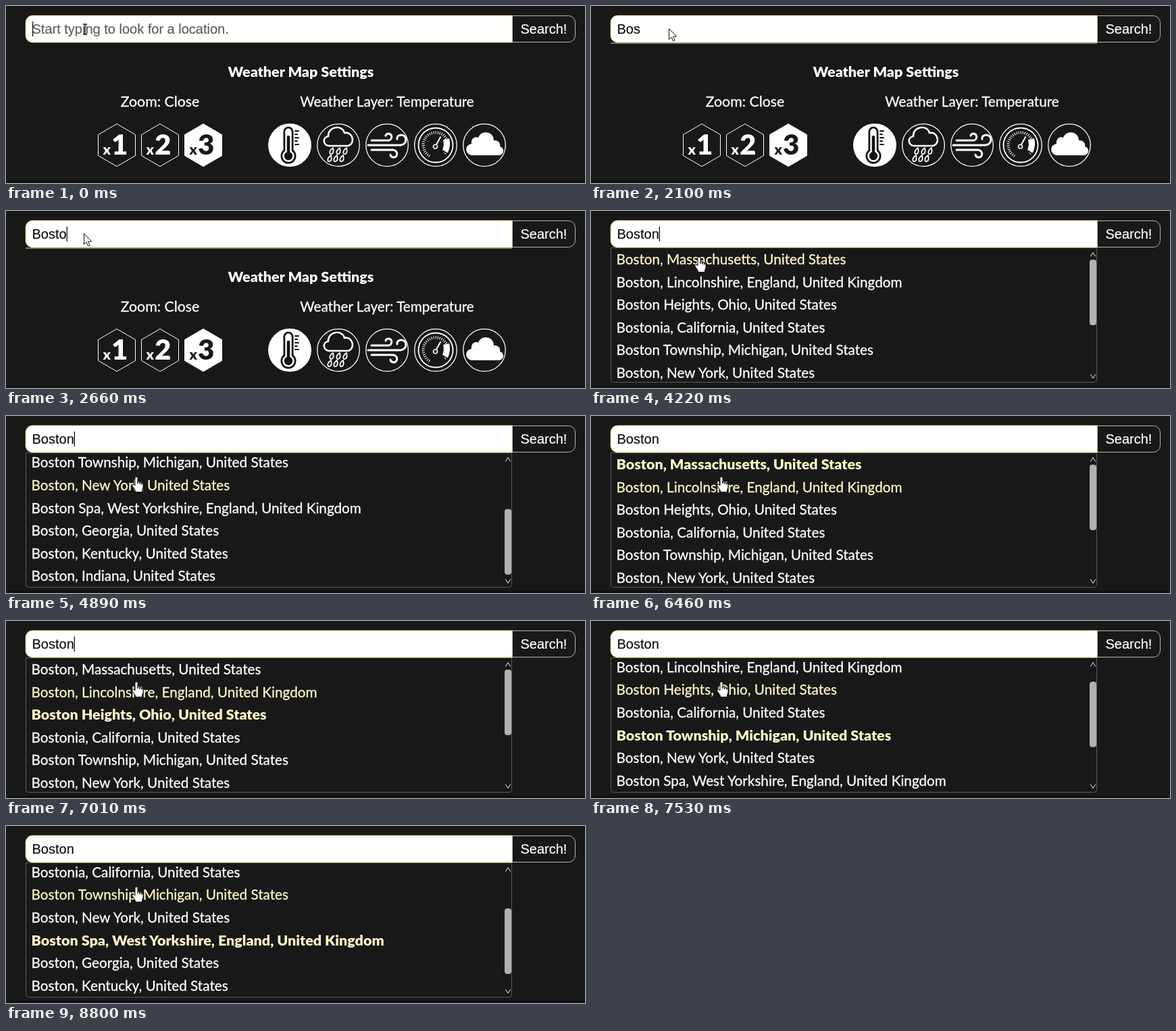
Animation of 857 by 262 pixels, one loop 8.95 s. Source, as an HTML page:

```html
<!DOCTYPE html>
<html lang="en">
<head>
<meta charset="utf-8">
<title>Location search</title>
<style>
  html, body { margin: 0; width: 100%; height: 100%; overflow: hidden; background: #181818; }
  svg { display: block; }
  text {
    font: 20.7px Lato, sans-serif; white-space: pre;
    color: #fff; fill: currentColor; stroke: currentColor; stroke-width: .3px;
  }
  .field { font: 20px "Liberation Sans", Arial, sans-serif; stroke-width: .2px; }
  .heavy, .bold { font-weight: 900; font-size: 21.5px; stroke: none; }
  .line { fill: none; stroke: #fff; stroke-linecap: round; stroke-linejoin: round; }
  .pale { color: #fff8c8; }
</style>
</head>
<body>
<svg width="857" height="262" viewBox="0 0 857 262">
  <rect width="857" height="262" fill="#181818"/>
  <rect y="258" width="857" height="4" fill="#111"/>

  <text class="heavy" x="436.5" y="105" text-anchor="middle">Weather Map Settings</text>
  <text x="228" y="149" text-anchor="middle" style="font-size:21.3px">Zoom: Close</text>
  <text x="564" y="149" text-anchor="middle">Weather Layer: Temperature</text>
  <g id="zooms"></g>
  <g id="rings"></g>

  <!-- thermometer -->
  <g stroke="#111" stroke-linecap="round" fill="none">
    <path d="M418 186V221" stroke-width="15"/>
    <circle cx="418" cy="222" r="11.5" fill="#111" stroke="none"/>
    <path d="M418 186V221" stroke="#fff" stroke-width="9.5"/>
    <circle cx="418" cy="222" r="8.8" fill="#fff" stroke="none"/>
    <path d="M418 194V221" stroke-width="4.5"/>
    <circle cx="418" cy="222" r="6.2" fill="#111" stroke="none"/>
    <path d="M428 185h5M428 190h3M428 195h5M428 200h3M428 205h5" stroke-width="2"/>
  </g>
  <!-- rain -->
  <path class="line" stroke-width="2.6" d="M478 207C469 206 468 194 477 193C476 178 498 175 501 188C513 185 518 204 506 207Z"/>
  <g id="drops" class="line" stroke-width="1.8"></g>
  <!-- wind -->
  <path class="line" stroke-width="3" d="M541 199H566C573 198 572 188 565 189Q562 190 562 192M536 206H584C595 205 594 190 584 191Q578 192 579 197M541 213H573C581 214 580 225 573 224Q569 223 569 220"/>
  <!-- gauge -->
  <g class="line">
    <circle cx="636" cy="206" r="25.5" stroke-width="1.8"/>
    <path d="M627 222A18.5 18.5 0 1 1 649 219" stroke-width="4" stroke-dasharray="1 2" stroke-linecap="butt"/>
    <path d="M647 198L656 196Q659 206 654 217L646 213Q649 206 647 198Z" fill="#fff" stroke="none"/>
    <path d="M636 207L643 194" stroke-width="2"/>
    <circle cx="635.5" cy="208" r="3" stroke-width="1.6" fill="#181818"/>
  </g>
  <!-- cloud -->
  <path fill="#fff" d="M690 221C679 220 678 206 689 204C688 195 695 192 699 195C703 183 722 185 722 199C731 198 732 206 731 208C739 210 737 221 729 221Z"/>

  <path id="strip" d="M29 55H749" stroke="#777" stroke-width="2"/>
  <g id="list">
    <path d="M29.5 54.5H748.5V249.5a4 4 0 0 1-4 4H33.5a4 4 0 0 1-4-4Z" fill="#181818" stroke="#5c5c5c"/>
    <clipPath id="view"><rect x="30" y="55" width="707" height="198"/></clipPath>
    <g clip-path="url(#view)"><g id="rows"></g></g>
    <path class="line" stroke-width="1.1" style="stroke:#ccc" d="M739.5 67l3.5-5.5 3.5 5.5M739.5 242l3.5 5.5 3.5-5.5"/>
    <rect id="thumb" x="738" y="72" width="10" height="97" rx="4" fill="#b1b1b1"/>
  </g>

  <path d="M749 14.5H39.5a10 10 0 0 0-10 10V43.5a10 10 0 0 0 10 10H749Z" fill="#fff" stroke="#fff0b8" stroke-width="1.5"/>
  <path d="M749.5 14.5H832.5a10 10 0 0 1 10 10V43.5a10 10 0 0 1-10 10H749.5Z" fill="#181818" stroke="#b8b8b8"/>
  <text class="field" x="761.5" y="41">Search!</text>
  <text id="typed" class="field" x="38.5" y="41"></text>
  <rect id="caret" y="23" width="1.2" height="22" fill="#000"/>

  <g id="pointer">
    <path id="beam" d="M-3-7.5H-1Q0-7.5 0-6.5Q0-7.5 1-7.5H3M0-6.5V6.5M-3 7.5H-1Q0 7.5 0 6.5Q0 7.5 1 7.5H3" fill="none" stroke="#111" stroke-width="1.3"/>
    <path id="arrow" d="M0 0V16L3.6 12.6L6 18.3L8.5 17.2L6.1 11.7H11.2Z" fill="#fff" stroke="#111"/>
    <path id="hand" d="M-2 1.5Q-2 0 0 0T2 1.5V10V7Q4.500 6 5 8V11V8Q7.300 7 7.800 9V11.500V9Q10 8.500 10 11V15.500Q9 18 8.500 20V22.500H-1.500V20.500Q-4 17-6 13.500C-7 11-4.500 10-2 13Z" fill="#fff" stroke="#111"/>
  </g>
</svg>
<script>
const $ = id => document.getElementById(id);
const LOOP = 8950, ROW = 33.6;
const US = ", United States", UK = ", England, United Kingdom";
const places = [
  "Boston, Massachusetts" + US, "Boston, Lincolnshire" + UK, "Boston Heights, Ohio" + US,
  "Bostonia, California" + US, "Boston Township, Michigan" + US, "Boston, New York" + US,
  "Boston Spa, West Yorkshire" + UK, "Boston, Georgia" + US, "Boston, Kentucky" + US,
  "Boston, Indiana" + US
];

// Static icons
[1, 2, 3].forEach(n => {
  const x = 100 + 64 * n, on = n === 3, ink = on ? "#181818" : "#fff";
  $("zooms").innerHTML +=
    `<path d="M${x} 174.5l27.5 16v31l-27.5 16-27.5-16v-31z" fill="${on ? "#fff" : "none"}" stroke="#fff"/>
     <text class="heavy" x="${x - 20.5}" y="219.5" style="font-size:21px;color:${ink}">x</text>
     <text class="heavy" x="${x - 8}" y="220" style="font-size:42px;color:${ink}">${n}</text>`;
});
for (let i = 0; i < 5; i++) {
  $("rings").innerHTML +=
    `<circle cx="${420 + 72 * i}" cy="206" r="31.3" fill="${i ? "none" : "#fff"}" stroke="#fff" stroke-width="1.3"/>`;
}
[[482, 212], [492, 212], [502, 212], [479, 223], [488, 223], [497, 223]].forEach(([x, y]) => {
  $("drops").innerHTML += `<path d="M${x + 2} ${y - 2}C${x - 5} ${y + 3} ${x - 3} ${y + 8} ${x} ${y + 7}S${x + 3} ${y + 2} ${x + 2} ${y - 2}Z"/>`;
});
$("rows").innerHTML = places.map((p, i) => `<text x="37.5" y="${79 + ROW * i}">${p}</text>`).join("");

// Each step overrides part of the state before it
const steps = [
  [0, { text: "", caret: 1, open: 0, sel: -1, scroll: 0, kind: "beam", x: 117, y: 34.5 }],
  [280, { caret: 0 }],
  [710, { text: "B", caret: 1, kind: "arrow", x: 115.5, y: 33.5 }],
  [1290, { caret: 0 }],
  [1430, { text: "Bo", caret: 1 }],
  [1570, { text: "Bos" }],
  [2100, { caret: 0 }],
  [2360, { open: 1 }],
  [2660, { text: "Bosto", caret: 1, open: 0 }],
  [2780, { text: "Boston" }],
  [3360, { caret: 0 }],
  [3480, { open: 1 }],
  [3760, { caret: 1 }],
  [4220, { kind: "hand", x: 160, y: 68 }],
  [4340, { caret: 0, x: 178, y: 80 }],
  [4480, { x: 193, y: 90 }],
  [4610, { scroll: 70 }],
  [4890, { scroll: 137, caret: 1 }],
  [5170, { scroll: 60 }],
  [5320, { scroll: 0, caret: 0 }],
  [5920, { caret: 1 }],
  [6310, { sel: 0 }],
  [6460, { caret: 0 }],
  [6610, { sel: 1 }],
  [6890, { sel: 2 }],
  [7010, { caret: 1 }],
  [7160, { sel: 3 }],
  [7530, { sel: 4, caret: 0 }],
  [7800, { sel: 5 }],
  [7930, { sel: 6, caret: 1 }],
  [8510, { caret: 0 }]
];

const show = (id, on) => $(id).setAttribute("visibility", on ? "visible" : "hidden");

function draw(s) {
  const typed = $("typed");
  typed.textContent = s.text || "Start typing to look for a location.";
  typed.style.color = s.text ? "#111" : "#5c6060";
  $("caret").setAttribute("x", s.text ? 38.5 + typed.getComputedTextLength() : 39);
  show("caret", s.caret);
  show("strip", s.text && !s.open);
  $("list").style.display = s.open ? "" : "none";

  const scroll = Math.max(s.scroll, ROW * s.sel - 97.6, 0);
  const hover = s.kind === "hand" ? Math.floor((s.y - 55 + scroll) / ROW) : -1;
  $("rows").setAttribute("transform", `translate(0 ${-scroll})`);
  $("thumb").setAttribute("y", 72 + scroll * 50 / 104);
  [...$("rows").children].forEach((row, i) => {
    row.classList.toggle("bold", i === s.sel);
    row.classList.toggle("pale", i === s.sel || i === hover);
  });

  for (const kind of ["beam", "arrow", "hand"]) show(kind, kind === s.kind);
  $("pointer").setAttribute("transform", `translate(${s.x} ${s.y})`);
}

const start = performance.now();
let shown = 0;
function frame() {
  const t = (performance.now() - start) % LOOP;
  const count = steps.filter(([at]) => at <= t).length;
  if (count !== shown) {
    draw(Object.assign({}, ...steps.slice(0, count).map(([, change]) => change)));
    shown = count;
  }
  requestAnimationFrame(frame);
}
frame();
</script>
</body>
</html>
```
